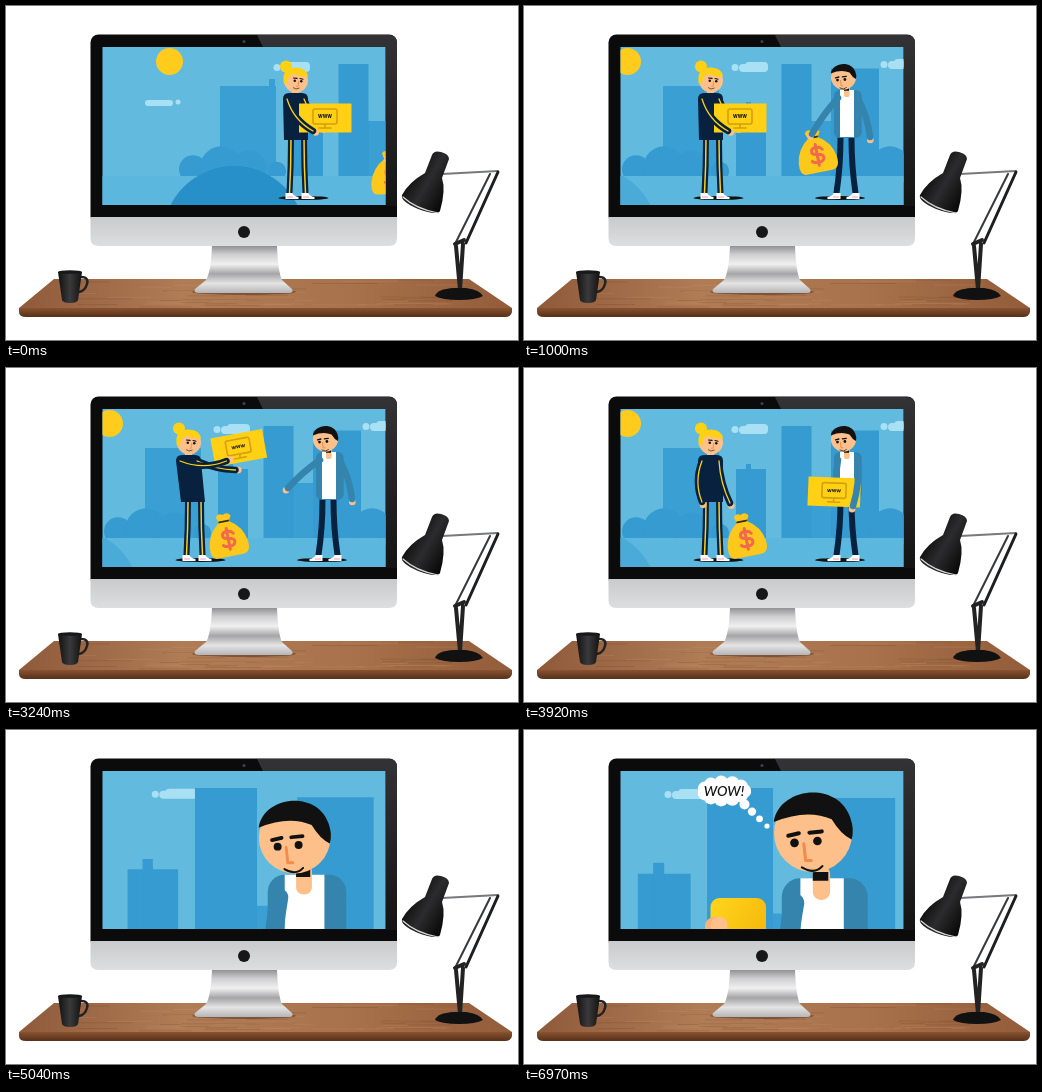
An HTML page with a canvas for the animation above (7.67 s loop, 512 by 334 pixels).

```html
<!DOCTYPE html>
<html lang="en">
<head>
<meta charset="utf-8">
<title>Desk animation</title>
<style>
  html, body { margin: 0; width: 100%; height: 100%; overflow: hidden; background: #fff; }
  canvas { display: block; }
</style>
</head>
<body>
<canvas id="stage" width="512" height="334"></canvas>
<script>
const c = document.getElementById('stage').getContext('2d');
const LOOP = 7670, STEP = 40;
const SKY = '#62bbdf', TOWER = '#359bd0', FAR_TOWER = '#3a9fd3', GROUND = '#5bb7de', HILL = '#2790c9', CLOUD = '#a9e0f3';
const SKIN = '#fdc08b', NAVY = '#07213f', JACKET = '#3484ae', YELLOW = '#ffd014', INK = '#111';

// Drawing helpers
const fill = (color, d) => { c.fillStyle = color; c.fill(new Path2D(d)); };
const line = (color, width, d) => {
  c.strokeStyle = color; c.lineWidth = width; c.lineCap = c.lineJoin = 'round';
  c.stroke(new Path2D(d));
};
const rect = (color, x, y, w, h, r = 0) => {
  c.fillStyle = color; c.beginPath(); c.roundRect(x, y, w, h, r); c.fill();
};
const disc = (color, x, y, rx, ry = rx) => {
  c.fillStyle = color; c.beginPath(); c.ellipse(x, y, rx, ry, 0, 0, 7); c.fill();
};
const gradient = (x0, y0, x1, y1, ...colors) => {
  const g = c.createLinearGradient(x0, y0, x1, y1);
  colors.forEach((color, i) => g.addColorStop(i / (colors.length - 1), color));
  return g;
};
const label = (text, x, y, font) => {
  c.fillStyle = INK; c.font = font; c.textAlign = 'center'; c.textBaseline = 'middle';
  c.fillText(text, x, y);
};
const group = (x, y, draw, { angle = 0, sx = 1, sy = 1 } = {}) => {
  c.save(); c.translate(x, y); c.scale(sx, sy); c.rotate(angle); draw(); c.restore();
};

// Timing helpers
const ramp = (t, a, b) => Math.min(1, Math.max(0, (t - a) / (b - a)));
const ease = (t, a, b) => { const u = ramp(t, a, b); return u * u * (3 - 2 * u); };
const arc = u => 4 * u * (1 - u);
// Moves a pose towards each next pose by that move's progress.
const blend = (pose, ...moves) =>
  moves.reduce((p, [u, next]) => p.map((v, i) => v + (next[i] - v) * u), pose);

function seeded(seed) {
  return () => (seed = seed * 16807 % 2147483647) / 2147483647;
}

// Desk, monitor, mug and lamp
function drawDesk() {
  rect('#fff', 0, 0, 512, 334);
  fill(gradient(13, 0, 506, 0, '#8f5a3a', '#b07c56', '#a8724c', '#935c3a'), 'M48 273H463L506 302H13Z');
  const random = seeded(7);
  for (let i = 0; i < 45; i++) {
    const y = 274 + random() * 27, x = 52 + random() * 370, w = 20 + random() * 50;
    line(`rgba(${random() < .5 ? '85,45,20' : '215,165,120'},.2)`, .8, `M${x} ${y}h${w}`);
  }
  fill(gradient(0, 302, 0, 311, '#8a5230', '#55301a'), 'M13 302H506V306Q505 311 499 311H20Q13 311 13 306Z');

  disc('rgba(40,20,8,.35)', 238, 286, 52, 3);
  fill(gradient(0, 239, 0, 287, '#8b8b8d', '#cfcfd1', '#f0f0f0', '#a5a5a7', '#e4e4e4', '#b5b5b7'),
    'M206 239H271Q272 266 276 274L286 283Q288 287 283 287H193Q187 287 189 283L200 274Q205 266 206 239Z');
  rect('#0b0b0c', 84.5, 28.5, 306.5, 190, 8);
  fill(gradient(0, 29, 0, 200, '#333336', '#141415'), 'M251 29H383Q391 29 391 37V200H380V41H257Z');
  fill(gradient(0, 211, 0, 240, '#c9cacc', '#dddee0'),
    'M84.5 211H391V232Q391 240 383 240H92.5Q84.5 240 84.5 232Z');
  disc('#17171a', 238, 226, 6);
  disc('#39414b', 238, 35.5, 1.6);

  line('#222', 2.5, 'M75 271Q83 271 81 278Q79 285 73 286');
  fill(gradient(52, 0, 76, 0, '#111', '#3a3a3c', '#111'), 'M52 266H76L72 294Q71 297 64 297T56 294Z');
  disc('#17181a', 64, 266, 12, 1.8);

  line('#77797c', 2, 'M436 168L492 165');
  line('#1d1e20', 3, 'M492 166L460 237');
  line('#37393b', 2, 'M484 168L449 238');
  line('#222', 4, 'M449 238L458 234M450 240L454 284L457 238');
  fill('#111', 'M429 290Q431 283 448 282H460Q474 284 477 290Q470 294 453 294T429 290Z');
  fill(gradient(400, 165, 442, 190, '#050505', '#2c2c2e', '#080808'),
    'M426 149Q428 144 435 146Q443 148 443 153L436 172Q440 184 434 205Q431 210 412 203Q394 195 396 189Q403 176 419 167Z');
  line('#d9d9d5', 1.2, 'M397 191Q410 203 432 207');
}

function cloud(x, y, w) {
  disc(CLOUD, x, y + 1.5, 3.5);
  rect(CLOUD, x + 4, y - 2, w, 8, 4);
  rect(CLOUD, x + 10, y - 4, w - 6, 8, 4);
}

function drawBackdrop(pan, zoom) {
  const drift = 60 * pan;
  rect(SKY, 96, 41, 284, 159);
  disc('#ffcc1d', 103.5 + drift - 300 * zoom, 55.5, 13.5);
  rect(CLOUD, 59 + 80 * pan, 94, 28, 6, 3);
  disc(CLOUD, 92 + 80 * pan, 96, 2.5);
  cloud(211 + drift - 67 * zoom, 60 + 3 * zoom, 29 + 14 * zoom);
  cloud(360 + drift + 30 * zoom, 57, 28);

  c.save();
  c.translate(257 - 75 * zoom + 75 * pan, 58);
  c.scale(2.2 ** zoom, 2.2 ** zoom);
  c.translate(-257, -58);
  const tower = (x, top, w, color = TOWER) => rect(color, x, top, w, 172 - top);
  tower(139, 80, 56, FAR_TOWER);
  tower(188, 73, 6, FAR_TOWER);
  const annex = 212 + 14 * zoom;
  tower(annex, 101 - 4 * zoom, 30 - 6 * zoom);
  tower(annex + 10 - 3 * zoom, 96 - 4 * zoom, 5);
  tower(287, 115, 20, FAR_TOWER);
  tower(257.5, 58, 30);
  tower(307, 62.5, 48 - 12 * zoom);
  for (let i = 0; i < 4; i++) {
    const r = 14 + 7 * Math.sin(i * 1.3);
    disc(TOWER, 112 + 28 * i, 168 - r / 3, r);
    disc(TOWER, 342 + 24 * i, 168 - r / 3, r);
  }
  rect(GROUND, -100, 170, 800, 90);
  c.restore();

  c.globalAlpha = .3 + .7 * pan;
  disc(HILL, 63 + 165 * pan - 300 * zoom, 231, 71);
  c.globalAlpha = 1;
}

// People and props
function arm(x, y, [hx, hy], bend, color, stripe) {
  const ex = (x + hx) / 2 - (hy - y) * bend, ey = (y + hy) / 2 + (hx - x) * bend;
  const d = `M${x} ${y}Q${ex} ${ey} ${hx} ${hy}`;
  disc(SKIN, hx + (hx - ex) * .14, hy + (hy - ey) * .14, 3.3);
  line(color, 6.5, d);
  if (stripe) line(YELLOW, 1.3, d);
}

function legs(x, hip, spread, facing, stripe) {
  group(x, 0, () => {
    disc(INK, 6, 192, 25, 2);
    for (const side of [-1, 1]) {
      const foot = side * spread, d = `M${side * hip} 132Q${side * hip} 160 ${foot} 187`;
      line(NAVY, 6, d);
      if (stripe) line(YELLOW, 1.5, d);
      fill('#fff', `M${foot - 4} 187H${foot + 3}Q${foot + 4} 190 ${foot + 9} 191V193H${foot - 4}Z`);
      line('#ee9ab8', 1, `M${foot - 2} 191h5`);
    }
  }, { sx: facing });
}

function face() {
  line(INK, 1.3, 'M-8 .8L-4.6 0M-1.2 -.2L2.8 -.6');
  disc(INK, -6, 3.1, 1.4);
  disc(INK, 1.4, 2.5, 1.4);
  line('#f28b4b', 1, 'M-3 3.4L-2.4 8.8H-.6');
  line(INK, .7, 'M-3.6 11Q.5 13.4 3 10.6');
}

function drawGirl(lean) {
  legs(188.5, 6.5, 8, 1, true);
  rect(SKIN, 183 + lean, 82, 7, 9);
  fill(NAVY, `M${180 + lean} 87H${193 + lean}Q${199 + lean} 87 ${199 + lean} 93L199 134H175L${174 + lean} 93Q${174 + lean} 87 ${180 + lean} 87Z`);
  group(187 + lean, 74.5, () => {
    disc(YELLOW, -10, -14, 6);
    disc(SKIN, 0, 0, 12);
    fill(YELLOW, 'M-12.2 3Q-15 -13 0 -13Q11 -12.5 12 -4Q4 -3.5 -3 -7Q-8 -5 -9 3Z');
    group(0, -2, face, { sx: -.88, sy: .88 });
  });
}

function drawMan(dx, dy) {
  legs(322, 5.5, 9.5, -1);
  group(dx * .4, dy * .4, () => {
    rect(JACKET, 310, 84, 27.7, 48, 6);
    rect('#fff', 316, 84, 14, 47);
    rect(SKIN, 320, 80, 5.6, 11, 2.6);
    rect(INK, 320, 82, 5, 2.8);
  });
  group(319.5 + dx, 71 + dy, () => {
    disc(SKIN, 0, 0, 12.6);
    fill(INK, 'M-12.7 -3.6C-11 -15 8 -17 12 -5Q13.4 -1 12.4 2Q9 .5 6 -4.5Q-2 -8 -12.7 -3.6Z');
    face();
  });
}

function drawBag([x, y, angle], lift) {
  group(x, y - lift, () => {
    fill('#fbc81b', 'M-7 -2Q-4 -6 0 -3Q5 -6 8 -1L5 4Q18 12 20 27Q21 39 13 39H-13Q-20 39 -19 27Q-17 12 -5 4Z');
    line('#3b2a10', 1.8, 'M-4.5 3.5H4.5');
    line('#f26a4b', 3, 'M7 17Q5 14 1 14Q-4 14 -4 17.5Q-4 20.5 1 21Q7 22 7 25Q7 29 1 29Q-4 29 -5 27M1 11V32');
  }, { angle });
}

function drawBox([x, y, angle], lift) {
  group(x, y - lift, () => {
    rect(YELLOW, -26, -14.5, 52.5, 29);
    line('#d3a00e', 1.6, 'M-10 -9H10Q12 -9 12 -7V4Q12 6 10 6H-10Q-12 6 -12 4V-7Q-12 -9 -10 -9ZM0 7V9M-6 10H6');
    label('www', 0, -1.5, 'bold 5.5px Inter, sans-serif');
  }, { angle });
}

function drawCast(t, pan, zoom) {
  const enter = ease(t, 0, 900), back = ease(t, 1400, 1900), swing = ease(t, 1900, 2400);
  const thrown = ramp(t, 2440, 2800), offer = ease(t, 2880, 3240), toss = ramp(t, 3320, 3700);
  const release = ease(t, 3400, 3900), nod = ease(t, 6080, 6440), crouch = swing * (1 - thrown);

  const grip = blend([280, 149, -.05], [enter, [288, 128, -.2]], [back, [301, 126, .1]], [swing, [276, 128, -.78]]);
  const bag = blend(grip, [thrown, [217, 150, -.2]]);
  const held = blend([216, 112, 0], [offer, [232.5, 80, -.18]]);
  const box = blend(held, [toss, [310, 124, .04]]);
  const girlNear = blend([held[0] - 12, held[1] + 13], [release, [178, 134]]);
  const girlFar = blend([held[0] - 3, held[1] + 10 + 12 * offer], [release, [206, 135]]);
  const manLeft = blend(grip.slice(0, 2), [thrown, [282, 120]], [toss, [312, 132]]);
  const manRight = blend([346, 131], [crouch, [361, 128]], [toss, [329, 138]]);
  const lean = -4 * offer * (1 - release), dx = nod - 2 * crouch, dy = 9 * crouch - 2.5 * nod;

  const scale = 3.1 ** zoom, shift = 33.5 * zoom - 103 * pan;
  c.save();
  c.translate(319.5 - shift, 71 + 40 * zoom);
  c.scale(scale, scale);
  c.translate(-319.5, -71);

  c.save();
  if (zoom > 0) {
    c.beginPath(); c.rect(319.5 + (114 - 319.5 + shift) / scale, -100, 500, 500); c.clip();
  }
  drawGirl(lean);
  arm(195 + lean, 93, girlFar, .1, NAVY, true);
  c.restore();

  drawMan(dx, dy);
  drawBag(bag, 40 * arc(thrown));
  arm(314 + dx * .4, 92 + dy * .4, manLeft, .06, JACKET);
  drawBox(box, 32 * arc(toss));
  if (zoom < .2) arm(178 + lean, 93, girlNear, .2, NAVY, true);
  arm(333.7 + dx * .4, 92 + dy * .4, manRight, -.1, JACKET);
  c.restore();
}

function drawCard(t) {
  group(0, 45 * (1 - ease(t, 5240, 5600)), () => {
    rect(gradient(187, 168, 242, 200, '#ffd51d', '#f5b90c'), 186.5, 168, 55.5, 50, 9);
    rect('#f7b17a', 181, 187, 22, 30, 9);
    disc(SKIN, 195, 195, 8.5);
  });
}

function drawThought(t) {
  for (let i = 0; i < 4; i++)
    disc('#fff', 243 - 7.5 * i, 96 - 7.2 * i, (2.6 + .8 * i) * ease(t, 6400 + i * 40, 6480 + i * 40));
  const size = ease(t, 6520, 6720);
  group(200, 61, () => {
    disc('#fff', 0, 0, 22, 12);
    for (let a = 0; a < 2 * Math.PI; a += Math.PI / 5.5)
      disc('#fff', 20 * Math.cos(a), 8.5 * Math.sin(a), 7);
    label('WOW!', 0, .5, 'italic 500 14px Lato, sans-serif');
  }, { sx: size, sy: size });
}

function draw(now) {
  const t = Math.floor(now % LOOP / STEP) * STEP;
  const pan = 1 - ease(t, 0, 960), zoom = ease(t, 4080, 5240);
  drawDesk();
  c.save();
  c.beginPath(); c.rect(96.5, 41, 283, 158); c.clip();
  drawBackdrop(pan, zoom);
  drawCast(t, pan, zoom);
  if (t > 5240) drawCard(t);
  if (t > 6400) drawThought(t);
  c.restore();
}

const start = performance.now();
(function frame() {
  draw(performance.now() - start);
  requestAnimationFrame(frame);
})();
</script>
</body>
</html>
```
